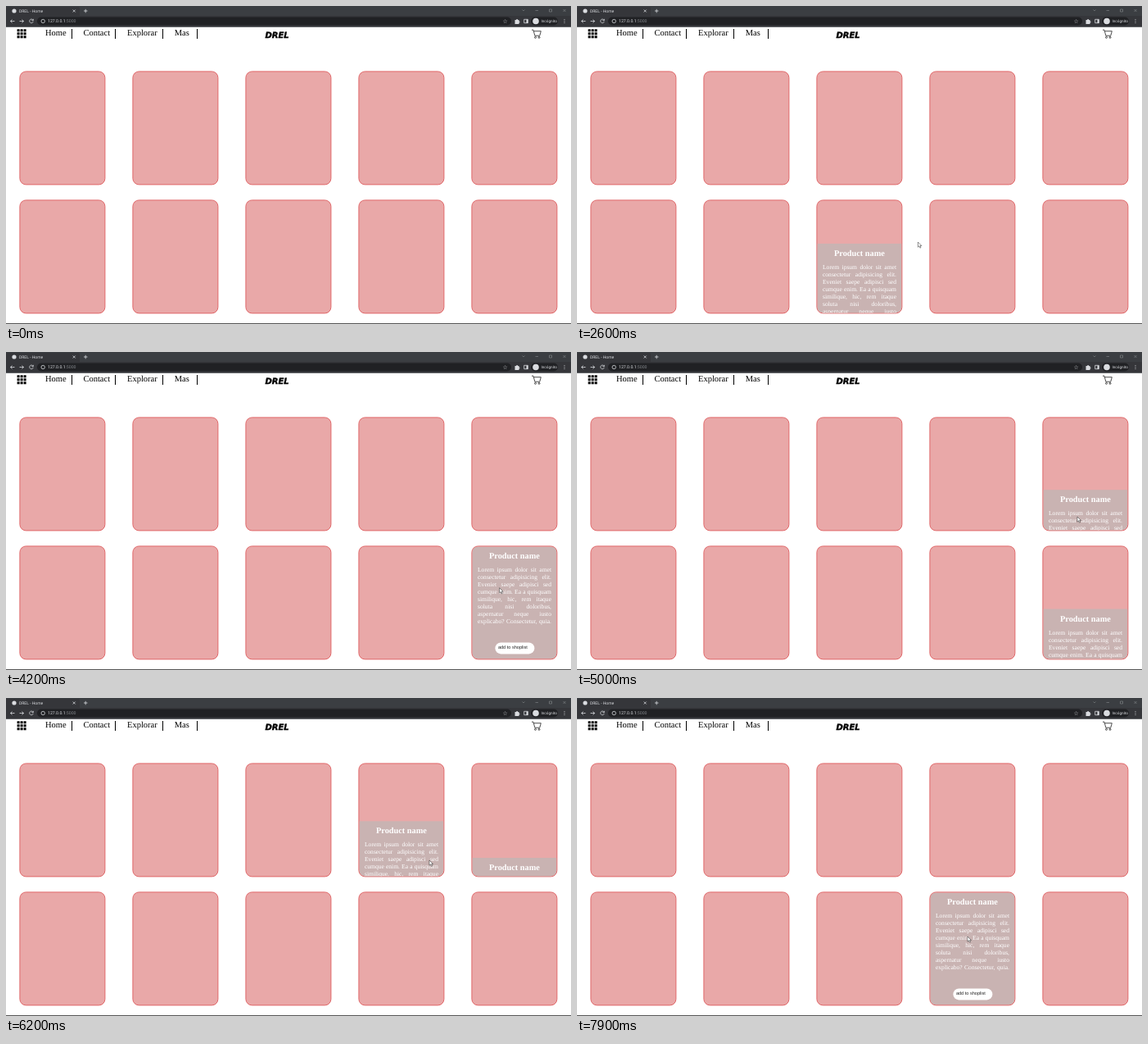
An HTML page that plays this animation: 690 by 388 pixels, repeating every 8 s.

```html
<!DOCTYPE html>
<html lang="es">
<head>
<meta charset="utf-8">
<title>DREL - Home</title>
<style>
  html, body { margin: 0; width: 100%; height: 100%; overflow: hidden; background: #fff; }
  #stage { position: relative; width: 690px; height: 388px; overflow: hidden; text-rendering: geometricPrecision; }
  svg { position: absolute; left: 0; top: 0; overflow: visible; }
  .ui { font-family: Roboto, "Open Sans", sans-serif; font-size: 5px; fill: #dadce0; }
  .line { fill: none; stroke: #dadce0; stroke-width: .8; }
  .dim { fill: none; stroke: #85888c; stroke-width: .6; }
  .brand { font: italic bold 10px "DejaVu Sans", sans-serif; stroke: #000; stroke-width: .4; }
  .cart { fill: none; stroke: #222; stroke-width: .8; }
  nav { position: absolute; left: 34.3px; top: 28.4px; display: flex; font: 10.5px/12px "Liberation Serif", serif; }
  nav span { box-sizing: border-box; min-width: 28.5px; margin-left: 13.6px; padding-right: 6.3px; border-right: 1px solid #000; }
  .card {
    position: absolute; left: 0; top: 0; box-sizing: border-box; width: 105px; height: 139px; overflow: hidden;
    border: 1px solid #e06668; border-radius: 8px; background: #e9a8a8;
  }
  .panel {
    position: absolute; left: 0; top: 0; width: 103px; height: 137px;
    background: #c9b3b2; color: #fff; font-family: "Liberation Serif", serif;
  }
  .panel h3 { position: absolute; top: 6px; width: 100%; margin: 0; font-size: 10.3px; line-height: 13px; text-align: center; }
  .panel p {
    position: absolute; left: 6.6px; top: 25.2px; width: 90px; margin: 0;
    font-size: 7.55px; line-height: 8.93px; text-align: justify; text-align-last: justify;
  }
  .panel span {
    position: absolute; left: 27.5px; top: 116.5px; width: 44px; height: 14px; padding-left: 4px;
    border-radius: 7px; background: #fff; color: #222; font: 5.58px/14px "Liberation Sans", sans-serif;
  }
</style>
</head>
<body>
<div id="stage">
  <svg width="690" height="388">
    <!-- browser window -->
    <rect width="690" height="25.5" fill="#3b3e42"/>
    <path d="M0 12V3q0-2 2-2H88q2 0 2 2V12H690V25.5H0z" fill="#35363a"/>
    <rect x="38" y="13.5" width="579" height="10" rx="5" fill="#202124"/>
    <rect x="641" y="13.5" width="33" height="10" rx="5" fill="#202124"/>
    <g class="ui">
      <circle cx="10" cy="6" r="2.6"/>
      <text x="16" y="7.8">DREL - Home</text>
      <text x="51" y="20.4" font-size="5.2">127.0.0.1<tspan fill="#85888c">:5000</tspan></text>
      <text x="606.5" y="21" font-family="DejaVu Sans" font-size="7">☆</text>
      <circle cx="647" cy="18.5" r="3.8"/>
      <text x="653.5" y="20.2" font-size="4.7">Incógnito</text>
      <path d="M621.5 17h1.6a1 1 0 0 1 2 0h1.4v1.6a1 1 0 0 1 0 2V22h-5zM635.5 16.5h1.8V21h-1.8z"/>
    </g>
    <path class="line" d="M81.7 4.5l3 3m0-3l-3 3M95 6h4.5M97.2 3.8v4.5M10.5 18.5h-5l2-2m-2 2l2 2M16.5 18.5h5l-2-2m2 2l-2 2
      M33 17.2a2.3 2.3 0 1 0 .2 2M33.3 15.8v1.9h-1.9M632.7 16.3h4.6v4.4h-4.6z"/>
    <path class="line" d="M682 16v5" stroke-dasharray="1 1"/>
    <path class="dim" d="M630.5 4.5L632 6l1.5-1.5M646.5 5.5h3.5M663.5 4h3v3h-3zM680.5 4l3 3m0-3l-3 3"/>
    <circle class="line" cx="45.2" cy="18.5" r="2.2"/>
    <!-- page header -->
    <path d="M13.6 29.8h12m-12 4h12m-12 4h12" stroke="#000" stroke-width="3" stroke-dasharray="3 1"/>
    <text class="brand" x="316.5" y="39.3">DREL</text>
    <g class="cart">
      <path d="M642 29.2h2l1.8 7h6l1.5-5.5h-8.8"/>
      <circle cx="646.5" cy="38.3" r="1"/><circle cx="651" cy="38.3" r="1"/>
    </g>
    <rect y="387" width="690" height="1" fill="#555"/>
  </svg>
  <nav><span>Home</span><span>Contact</span><span>Explorar</span><span>Mas</span></nav>
</div>
<script>
const LOOP = 8000, STEP = 100, SLIDE = 400;
const COLUMNS = 5, LEFT = 16.4, TOP = 79.4, PITCH_X = 138, PITCH_Y = 157, WIDTH = 105, HEIGHT = 139;
const stage = document.getElementById('stage');

const panelHTML = `<div class="panel"><h3>Product name</h3><p>${[
  'Lorem ipsum dolor sit amet', 'consectetur adipisicing elit.', 'Eveniet saepe adipisci sed',
  'cumque enim. Ea a quisquam', 'similique, hic, rem itaque', 'soluta nisi doloribus,',
  'aspernatur neque iusto', 'explicabo? Consectetur, quia.'].join('<br>')}</p><span>add to shoplist</span></div>`;

const panels = Array.from({ length: 2 * COLUMNS }, (_, i) => {
  const card = document.createElement('div');
  card.className = 'card';
  const x = LEFT + PITCH_X * (i % COLUMNS), y = TOP + PITCH_Y * Math.floor(i / COLUMNS);
  card.style.transform = `translate(${x}px, ${y}px)`;
  card.innerHTML = panelHTML;
  stage.append(card);
  return card.firstChild;
});

stage.insertAdjacentHTML('beforeend', `<svg id="cursor" width="8" height="10">
  <path d="M0 0V6.2L1.5 4.9 2.5 7.2 3.6 6.7 2.6 4.5H4.5Z" fill="#fff" stroke="#222" stroke-width=".5"/></svg>`);
const cursor = document.getElementById('cursor');

// Where the pointer rests between moves: time, x, y
const stops = [
  [1420, 350, 400], [1700, 346, 272], [2200, 360, 288], [2900, 453, 288],
  [3400, 455, 288], [3900, 602, 288], [4740, 604, 287], [4975, 611, 201],
  [5800, 613, 191], [6194, 517, 198], [7200, 488, 200], [7700, 477, 291]
];

function pointerAt(time) {
  const next = stops.findIndex(stop => stop[0] > time);
  if (next <= 0) return stops.at(next).slice(1);
  const [from, to] = [stops[next - 1], stops[next]];
  const k = (time - from[0]) / (to[0] - from[0]);
  const smooth = k * k * (3 - 2 * k);
  return [1, 2].map(axis => from[axis] + (to[axis] - from[axis]) * smooth);
}

function cardAt([x, y]) {
  const column = Math.floor((x - LEFT) / PITCH_X), row = Math.floor((y - TOP) / PITCH_Y);
  const inside = x - LEFT - column * PITCH_X < WIDTH && y - TOP - row * PITCH_Y < HEIGHT;
  return inside && row < 2 ? row * COLUMNS + column : -1;
}

// Follow the pointer once to learn when it enters and leaves each card.
const hovers = [];
for (let time = 0, current = -1; time < LOOP; time++) {
  const card = cardAt(pointerAt(time));
  if (card === current) continue;
  if (current >= 0) hovers.at(-1).leave = time;
  if (card >= 0) hovers.push({ card, enter: time, leave: Infinity });
  current = card;
}

// CSS "ease": cubic-bezier(.25, .1, .25, 1)
function ease(x) {
  if (x <= 0) return 0;
  if (x >= 1) return 1;
  let low = 0, high = 1;
  for (let i = 0; i < 20; i++) {
    const s = (low + high) / 2;
    if (.75 * s * (1 - s) + s ** 3 < x) low = s; else high = s;
  }
  return .3 * low * (1 - low) ** 2 + 3 * low * low * (1 - low) + low ** 3;
}

function draw(time) {
  const rise = panels.map(() => 0);
  for (const { card, enter, leave } of hovers)
    rise[card] += ease((time - enter) / SLIDE) - ease((time - leave) / SLIDE);
  panels.forEach((panel, i) => {
    panel.style.transform = `translateY(${(1 - rise[i]) * 138}px)`;
  });
  const [x, y] = pointerAt(time);
  cursor.style.transform = `translate(${x}px, ${y}px)`;
}

const start = performance.now();
function tick() {
  const time = (performance.now() - start) % LOOP;
  draw(Math.floor(time / STEP) * STEP);
  requestAnimationFrame(tick);
}
tick();
</script>
</body>
</html>
```
